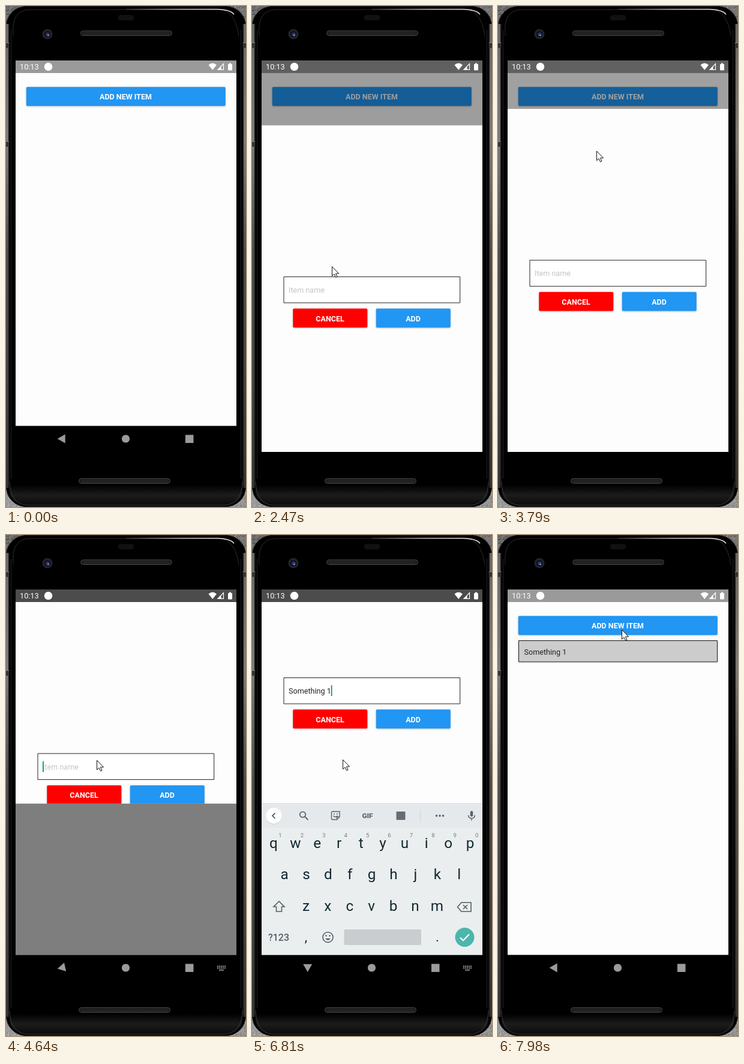
Write an HTML page with a canvas that moves like this. It is 400 px wide and 837 px high and loops after 8000 ms.

```html
<!DOCTYPE html>
<html lang="en">
<head>
<meta charset="utf-8">
<title>Add item modal</title>
<style>
html, body { margin: 0; width: 100%; height: 100%; overflow: hidden; background: #000; }
canvas { display: block; }
</style>
</head>
<body>
<canvas id="stage" width="400" height="837"></canvas>
<script>
const c = document.getElementById('stage').getContext('2d');
const LOOP = 8000, STEP = 77.3, START = 310;
const FONT = 'Roboto, sans-serif', BLUE = '#2196f3';

// Cursor stops: time, x, y
const PATH = [
  [310, 356, 302], [620, 230, 212], [850, 160, 152], [1090, 160, 152],
  [1315, 186, 276], [1700, 146, 420], [1940, 133, 435], [2474, 133, 435],
  [2780, 163, 235], [3160, 171, 161], [3560, 171, 161], [4170, 151, 376],
  [6815, 151, 375], [7080, 262, 308], [7240, 262, 308], [7580, 242, 225], [7970, 205, 157]
];
const CLICKS = [[930, 1090], [2170, 2340], [3230, 3500], [4170, 4300], [7080, 7200]];
// Modal open and close starts
const MODALS = [[1100, 2363], [3625, 7195]];
const KEYS_SHOWN = 4480, RESIZED = 4630, LIFTED = 4700, CLOSED = 7190;

const clamp = v => Math.max(0, Math.min(1, v));
const between = (t, a, b) => t >= a && t < b;

function track(keys, t) {
  let i = 0;
  while (i < keys.length - 2 && t > keys[i + 1][0]) i++;
  const [a, b] = [keys[i], keys[i + 1]];
  const p = clamp((t - a[0]) / (b[0] - a[0]));
  return a.slice(1).map((v, n) => v + (b[n + 1] - v) * p);
}

function rect(x, y, w, h, fill, r = 0, stroke) {
  c.beginPath();
  c.roundRect(x, y, w, h, r);
  if (fill) { c.fillStyle = fill; c.fill(); }
  if (stroke) { c.strokeStyle = stroke; c.lineWidth = 1; c.stroke(); }
}
function disc(x, y, r, fill) {
  c.beginPath();
  c.arc(x, y, r, 0, 7);
  c.fillStyle = fill;
  c.fill();
}
function ring(x, y, r, color, width = 1.6) {
  c.beginPath();
  c.arc(x, y, r, 0, 7);
  c.strokeStyle = color;
  c.lineWidth = width;
  c.stroke();
}
function shape(d, fill, stroke, width = 1.6, x = 0, y = 0, turn = 0) {
  c.save();
  c.translate(x, y);
  c.rotate(turn);
  const p = new Path2D(d);
  if (fill) { c.fillStyle = fill; c.fill(p); }
  if (stroke) { c.strokeStyle = stroke; c.lineWidth = width; c.stroke(p); }
  c.restore();
}
function text(s, x, y, size, color, align = 'left', weight = 400) {
  c.font = `${weight} ${size}px ${FONT}`;
  c.textAlign = align;
  c.fillStyle = color;
  c.fillText(s, x, y);
}
function button(x, y, w, color, label) {
  c.save();
  c.shadowColor = 'rgba(0,0,0,.28)';
  c.shadowBlur = 3;
  c.shadowOffsetY = .8;
  rect(x, y, w, 31.7, color, 1.8);
  c.restore();
  text(label, x + w / 2 - .3, y + 21.1, 12.5, '#fff', 'center', 700);
}
function gradient(x0, y0, x1, y1, ...stops) {
  const g = c.createLinearGradient(x0, y0, x1, y1);
  stops.forEach((s, i) => g.addColorStop(i / (stops.length - 1), s));
  return g;
}

function speaker(x, y) {
  rect(x + .5, y + .5, 152, 8, '#1c1c1c', 4, '#444');
  for (let i = 5; i < 149; i += 2)
    for (let j = 3; j < 8; j += 2) rect(x + i, y + j, 1, 1, '#343434');
}

// Grainy desk visible around the rounded corners
function desk() {
  let seed = 7;
  const random = () => (seed = seed * 16807 % 2147483647) / 2147483647;
  for (const [x, y, base] of [[0, 0, 70], [370, 0, 80], [0, 807, 120], [370, 807, 110]]) {
    for (let i = 0; i < 900; i++) {
      const v = base + random() * 70;
      rect(x + i % 30, y + Math.floor(i / 30), 1, 1, `rgb(${v},${v},${v})`);
    }
  }
}
function phone() {
  rect(0, 0, 400, 837, '#000');
  desk();
  rect(.5, .5, 399, 836, '#000', 33, '#222');
  const edge = gradient(0, 30, 0, 800, '#666', '#7a7a7a', '#4c4c4c', '#444', '#333');
  rect(0, 30, 4, 775, edge);
  rect(396, 30, 4, 775, edge);
  rect(4, 30, 2, 775, '#161616');
  rect(394, 30, 2, 775, '#161616');
  for (const [x, y] of [[0, 61], [0, 226], [395, 61]]) {
    rect(x, y, 5, 9, '#333');
    rect(x, y, 5, 1, '#888');
  }
  rect(8, 40, 1, 750, '#242424');
  rect(391, 40, 1, 750, '#242424');
  rect(5, 800, 390, 34, gradient(0, 800, 0, 834, '#000', '#1c1c1c', '#0b0b0b'), [0, 0, 28, 28]);
  shape('M12 50Q8 6 40 6H355Q382 7 388 50', null, '#2c2c2c', 1);
  shape('M200 5.5H352Q374 6 380 14', null, gradient(200, 0, 380, 0, '#333', '#bbb', '#eee'), 1.3);
  shape('M6 795Q7 831 34 834H366Q393 831 394 795', null, '#3a3a3a', 1);
  rect(187, 15, 26, 9, '#111', 4);
  disc(69, 47, 8.5, '#24242a');
  disc(69, 47, 5.5, '#11131f');
  disc(69.5, 47.5, 3, '#30387c');
  disc(70.5, 49, 1.3, '#8795d8');
  speaker(124, 41);
  speaker(121, 789);
}

function statusIcons() {
  text('10:13', 23, 106, 12.7, '#fff');
  disc(70.5, 101.5, 6.8, '#fff');
  shape('M337.5 98.5Q344.3 92.5 351 98.5L344.3 107Z', '#fff');
  shape('M362.5 96.5V106.3H353Z', null, '#fff', 1.2);
  shape('M358.5 100.5V106.5H352.5Z', '#fff');
  rect(370, 97, 7, 10.5, '#fff', 1);
  rect(372, 95.5, 3, 2, '#fff');
}

function navBar(t) {
  const grey = '#9b9b9b', typing = between(t, KEYS_SHOWN, CLOSED);
  const [turn] = track([[4480, 0], [4639, 12], [4717, 60], [4800, 90], [7190, 90], [7350, 0]], t);
  shape('M-7 0L6 -7.5V7.5Z', grey, null, 1, 92.7, 723, -turn * Math.PI / 180);
  disc(199.5, 723, 6.6, grey);
  rect(299, 716.5, 13.5, 13.5, grey);
  if (!typing) return;
  for (let j = 0; j < 2; j++)
    for (let i = 0; i < 5; i++) rect(352 + i * 3, 719.5 + j * 3, 2, 2, grey);
  rect(355, 726, 8, 1.6, grey);
}

function app(t) {
  rect(16, 91, 368, 610.5, '#fdfdfd');
  rect(16, 91, 368, 21, '#9a9a9a');
  button(33.8, 135.2, 332, BLUE, 'ADD NEW ITEM');
  if (t > 7150) {
    rect(34.5, 176.5, 331, 35.5, '#ccc', 0, '#111');
    text('Something 1', 43.5, 199.5, 12.6, '#222');
  }
}

function modalState(t) {
  for (const [open, close] of MODALS) {
    if (t < open || t > close + 300) continue;
    const p = clamp((t - open) / 300), q = clamp((t - close) / 300);
    return {
      offset: 633 * ((1 - p) ** 3 + q * q),
      dim: .5 * (1 - (1 - p) ** 1.7) * (1 - q ** 1.44)
    };
  }
  return null;
}

function typed(t) {
  if (t < 4940 || t > CLOSED) return '';
  const letters = t < 5340 ? 1 : Math.min(9, 2 + Math.floor((t - 5340) / 77));
  const count = t > 6345 ? 11 : t > 6105 ? 10 : letters;
  return 'Something 1'.slice(0, count);
}

function modal(t, offset) {
  const resized = between(t, RESIZED, CLOSED);
  const top = 112 + offset, bottom = Math.min(745, (resized ? 448.7 : 701.5) + offset);
  c.save();
  c.beginPath();
  c.rect(16, top, 368, Math.max(0, bottom - top));
  c.clip();
  rect(16, top, 368, 633, '#fdfdfd');
  const y = (between(t, LIFTED, CLOSED) ? 238 : 364.6) + offset;
  rect(53, y + .5, 293.7, 43.5, '#fff', 0, '#222');
  const value = typed(t), base = Math.round(y + 27);
  text(value || 'Item name', 61, base, 12.6, value ? '#222' : '#c4c4c4');
  const width = value ? c.measureText(value).width : 0;
  if (value && value.length < 10) rect(61, base + 2.5, width, 1, '#333');
  if (between(t, KEYS_SHOWN, CLOSED)) rect(61 + width, base - 14, 1.8, 18, '#009688');
  button(68.3, y + 53.6, 124, '#f00', 'CANCEL');
  button(206.8, y + 53.6, 124, BLUE, 'ADD');
  c.restore();
}

function toolbar(value) {
  const ink = '#5b6469', words = value && value.length < 11;
  rect(16, 449, 368, 40, '#e6e9ec');
  disc(36.5, 470, 13.3, '#cfd3d5');
  disc(36.5, 469, 13.2, '#fff');
  shape('M2 -4.5L-2.5 0L2 4.5', null, '#444c50', 1.7, 36.5, 469, words ? Math.PI : 0);
  rect(363.7, 461, 4.6, 9.5, ink, 2.3);
  shape('M360.5 468Q361 473.5 366 473.5T371.5 468M366 473.5V477', null, ink, 1.5);
  if (words) {
    const options = value.endsWith(' ') ? ['is', 'like', 'else'] : [value, 'something', 'Sometimes'];
    options.forEach((w, i) => text(w, 107 + i * 97.5, 474, 14, '#37474f', 'center'));
    rect(155, 460, 1, 19, '#cdd2d4');
    rect(253, 460, 1, 19, '#cdd2d4');
    return;
  }
  ring(84.5, 467, 4.7, ink, 1.8);
  shape('M88 470.5L93.5 476', null, ink, 2);
  shape('M134 462H146V471L141.5 475.5H134Q132.5 475.5 132.5 474V463.5Q132.5 462 134 462ZM146 471H141.5V475.5M135.5 469Q139 473 142.5 469', null, ink, 1.4);
  disc(137, 466, 1, ink);
  disc(142, 466, 1, ink);
  text('GIF', 192.5, 473, 11.8, ink, 'center', 900);
  rect(240.5, 462, 15, 14, '#656d72', 1);
  rect(280, 459, 1, 21, '#d2d6d9');
  for (const x of [307.5, 313, 318.5]) disc(x, 469, 1.8, ink);
}

function keyboard(t) {
  const drop = t < CLOSED
    ? track([[4639, 253], [4717, 110], [4794, 25], [4860, 0]], t)[0]
    : 253 * clamp((t - CLOSED) / 160);
  if (t < LIFTED || drop >= 253) return;
  const ink = '#13272f', soft = '#535e63';
  c.save();
  c.beginPath();
  c.rect(16, 449, 368, 252.5);
  c.clip();
  c.translate(0, drop);
  rect(16, 449, 368, 253, '#eaeeef');
  toolbar(typed(t));
  [['qwertyuiop', 36], ['asdfghjkl', 54], ['zxcvbnm', 90]].forEach(([row, x], j) => {
    [...row].forEach((k, i) => {
      text(k, x + i * 36.4, 523 + j * 52.4, 24.3, ink, 'center');
      if (!j) text((i + 1) % 10, x + 11 + i * 36.4, 505, 9.5, '#737c80', 'center');
    });
  });
  shape('M45 612L36 621H40.5V629H49.5V621H54Z', null, soft);
  shape('M349 614H365V629H349L342.5 621.5ZM352 618L359 625M359 618L352 625', null, soft);
  text('?123', 44.5, 677.5, 16, soft, 'center', 500);
  text(',', 90, 679, 22, ink, 'center');
  text('.', 309, 679, 22, ink, 'center');
  ring(126.5, 672, 8.5, soft);
  disc(123.5, 669.5, 1.3, soft);
  disc(129.5, 669.5, 1.3, soft);
  shape('M122 674Q126.5 680 131 674Z', soft);
  rect(153.5, 659, 128.5, 26, '#c9cdd0', 2);
  disc(354.5, 672, 16, '#4db6ac');
  shape('M347 672.5L352 677.5L362 667', null, '#fff', 2);
  c.restore();
}

function cursor(t) {
  if (t < 305) return;
  const [x, y] = track(PATH, t);
  if (CLICKS.some(([a, b]) => between(t, a, b))) disc(x, y - 1, 12, 'rgba(255,255,0,.5)');
  shape('M.5 .5V16.2L4 12.9L6.6 18.4L9 17.3L6.5 11.9H11.6Z', '#fff', '#111', 1, Math.round(x), Math.round(y));
}

function draw(now) {
  const raw = now % LOOP;
  // The screen refreshes in fixed steps
  const t = raw < START ? 0 : START + Math.floor((raw + 8 - START) / STEP) * STEP;
  c.drawImage(body, 0, 0);
  navBar(t);
  app(t);
  const m = modalState(t);
  if (m) {
    rect(16, 91, 368, 610.5, `rgba(0,0,0,${m.dim})`);
    modal(t, m.offset);
    keyboard(t);
  }
  statusIcons();
  cursor(t);
  requestAnimationFrame(tick);
}

// The phone never changes, so it is painted once and kept
phone();
const body = document.createElement('canvas');
body.width = 400;
body.height = 837;
body.getContext('2d').drawImage(c.canvas, 0, 0);

const begin = performance.now();
const tick = () => draw(performance.now() - begin);
tick();
</script>
</body>
</html>
```
